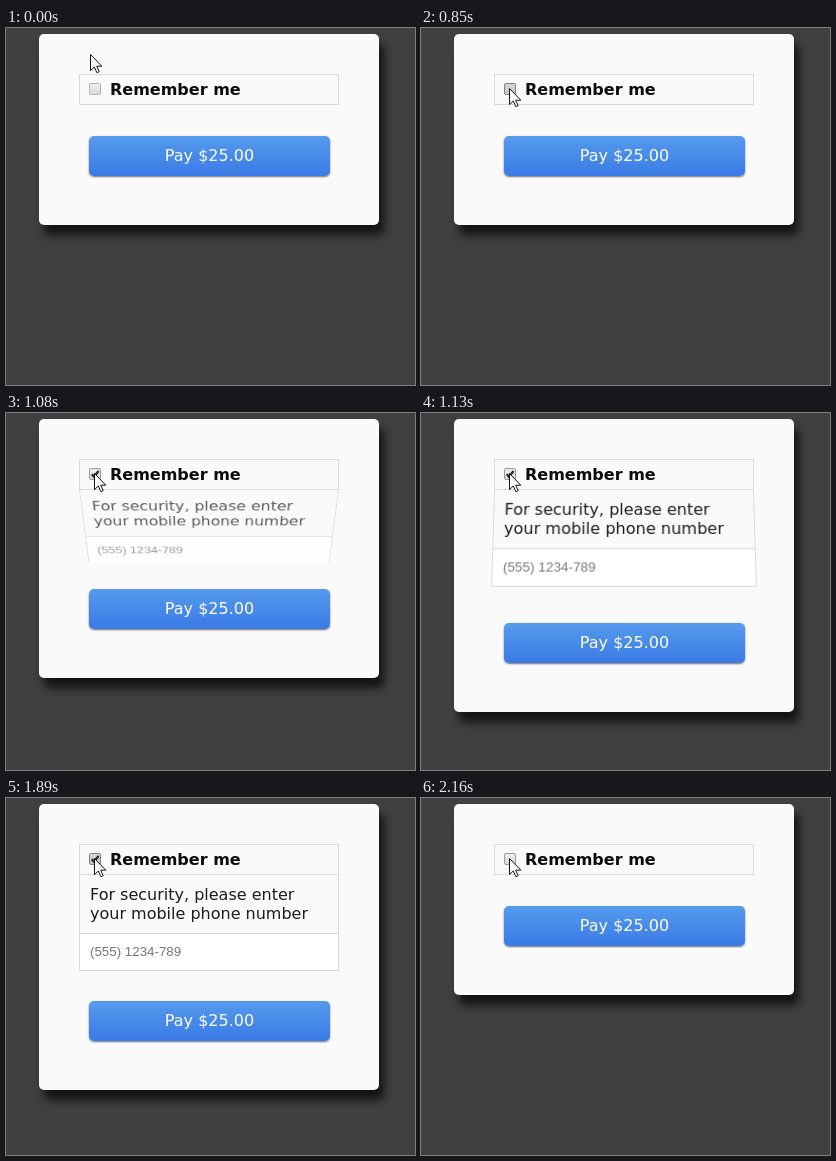
Recreate the animation shown at these times as an HTML page. Size 409x357 px, loop 3030 ms.

```html
<!DOCTYPE html>
<html lang="en">
<head>
<meta charset="utf-8">
<title>Remember me</title>
<style>
  html, body { margin: 0; width: 100%; height: 100%; overflow: hidden; background: #404040; }
  body { position: relative; font: 16px/19px "DejaVu Sans", sans-serif; color: #1c1c1c; }
  body * { position: absolute; box-sizing: border-box; white-space: nowrap; }
  #card { left: 33px; top: 6px; width: 340px; height: 191px; border-radius: 5px;
    background: #fafafa; box-shadow: 5px 10px 10px rgba(0, 0, 0, .72); }
  #row { left: 73px; top: 46px; width: 260px; height: 31px; border: 1px solid #dadada; }
  #row b { left: 30px; top: 5px; color: #0c0c0c; }
  #box { left: 83px; top: 55px; width: 12px; height: 12px; border: 1px solid #b4b4c4;
    border-radius: 2px; background: linear-gradient(#eee, #dadada); }
  #tick { left: 83px; top: 55px; opacity: 0; }
  #clip { left: 33px; top: 77px; width: 340px; height: 5px; overflow: hidden;
    perspective: 650px; perspective-origin: 50% 0; }
  #fold { left: 40px; top: 0; width: 260px; height: 96px; border: 1px solid #dadada; border-top: 0;
    transform-origin: 50% 0; backface-visibility: hidden; opacity: 0; }
  #ask { left: 10px; top: 10px; }
  #phone { left: 0; top: 58px; width: 258px; height: 37px; border-top: 1px solid #dadada;
    padding-left: 10px; background: #fff; color: #757575;
    font: 13.333px/35px "Liberation Sans", Arial, sans-serif; }
  #pay { left: 83px; top: 108px; width: 241px; height: 40px; border-radius: 5px; color: #fff;
    line-height: 40px; text-align: center; background: linear-gradient(#559bec, #3a7ae6);
    box-shadow: 0 1px 2px rgba(0, 0, 0, .55); }
  #cursor { left: 84px; top: 26px; }
</style>
</head>
<body>
  <div id="card"></div>
  <div id="clip">
    <div id="fold">
      <div id="ask">For security, please enter<br>your mobile phone number</div>
      <div id="phone">(555) 1234-789</div>
    </div>
  </div>
  <div id="row"><b>Remember me</b></div>
  <div id="box"></div>
  <svg id="tick" width="12" height="12"><path d="M2.8 6.2 5 8.8 9.6 3" fill="none" stroke="#2b2b2b" stroke-width="2.3"/></svg>
  <div id="pay">Pay $25.00</div>
  <svg id="cursor" width="14" height="21"><path d="M.5.5V16.6L4.3 13 6.9 18.7 9.2 17.7 6.7 12.2H11.8Z" fill="#fff" stroke="#111"/></svg>
<script>
  const LOOP = 3030;
  const GROW = 95;
  const HOLD = 'step-end';
  const SPRING = 'cubic-bezier(.6, 0, .4, 1.55)';
  const CUBIC_IN = 'cubic-bezier(.3333, 0, .6667, 0)';
  const start = document.timeline.currentTime || 0;

  // steps: [time in ms, styles, easing towards the next step]
  function play(id, steps) {
    const frames = steps.map(([ms, style, easing = 'linear']) => ({ ...style, offset: ms / LOOP, easing }));
    const anim = document.getElementById(id).animate(frames, { duration: LOOP, iterations: Infinity });
    anim.startTime = start;
  }

  function unfold(id, shut, open) {
    play(id, [
      [0, shut], [930, shut, SPRING], [1230, open],
      [1960, open, CUBIC_IN], [2160, shut], [LOOP, shut]
    ]);
  }

  const px = n => n + 'px';
  unfold('card', { height: px(191) }, { height: px(191 + GROW) });
  unfold('clip', { height: px(5) }, { height: px(5 + GROW) });
  unfold('pay', { top: px(108) }, { top: px(108 + GROW) });
  unfold('fold',
    { transform: 'rotateX(-118deg)', opacity: 0 },
    { transform: 'rotateX(0deg)', opacity: 1 });

  const from = { transform: 'translate(0px, 0px)' };
  const to = { transform: 'translate(4px, 34px)' };
  play('cursor', [[0, from], [140, from, 'ease-in-out'], [540, to], [LOOP, to]]);

  const idle = { borderColor: '#b4b4c4', filter: 'none' };
  const hover = { borderColor: '#9a9a9a', filter: 'none' };
  const press = { borderColor: '#8c8c8c', filter: 'brightness(.9)' };
  play('box', [
    [0, idle, HOLD], [460, hover, HOLD], [850, press, HOLD], [930, hover, HOLD],
    [1890, press, HOLD], [1960, hover, HOLD], [LOOP, hover]
  ]);
  play('tick', [
    [0, { opacity: 0 }, HOLD], [930, { opacity: 1 }, HOLD],
    [1960, { opacity: 0 }, HOLD], [LOOP, { opacity: 0 }]
  ]);
</script>
</body>
</html>
```
